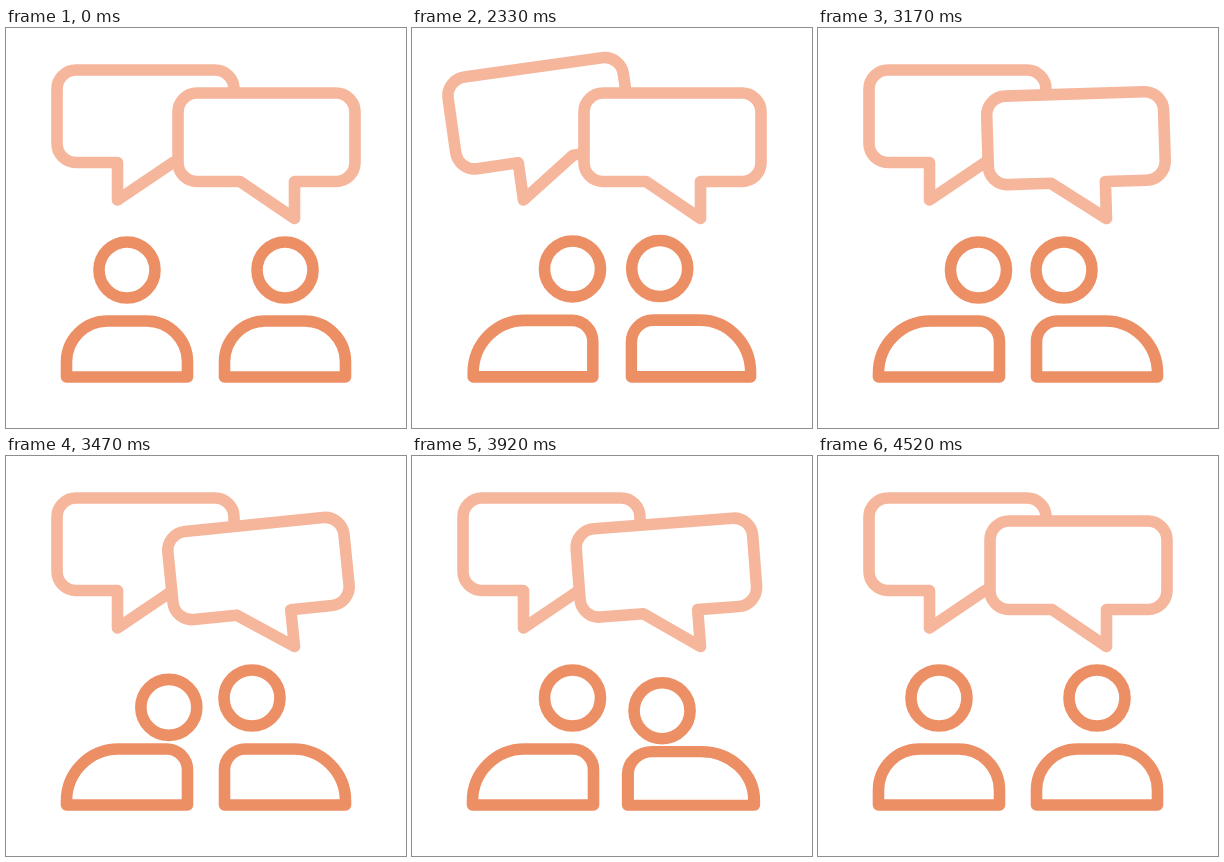
Animation, 400 px wide and 400 px high, one loop 4.55 s. Source, as an HTML page:

```html
<!DOCTYPE html>
<html lang="en">
<head>
<meta charset="utf-8">
<title>Conversation</title>
<style>
  html, body { margin: 0; height: 100%; overflow: hidden; background: #fff; }
  svg { display: block; width: 100vw; height: 100vh; }
  path, circle { stroke-width: 11.6; stroke-linejoin: round; fill: #fff; }
  .bubble { stroke: #f5b69c; }
  .person { stroke: #ed8f65; }
</style>
</head>
<body>
<svg viewBox="0 0 400 400">
  <path id="bubbleL" class="bubble" d="M111.5 172V134.5H70A19 19 0 0 1 51 115.5V61A19 19 0 0 1 70 42H209A19 19 0 0 1 228 61V115.5A19 19 0 0 1 209 134.5H167Z"/>
  <path id="bubbleR" class="bubble" d="M288.5 190.5V153.5H330A19 19 0 0 0 349 134.5V84A19 19 0 0 0 330 65H191A19 19 0 0 0 172 84V134.5A19 19 0 0 0 191 153.5H234Z"/>
  <g id="personL" class="person"><path/><circle r="28"/></g>
  <g id="personR" class="person" transform="translate(400) scale(-1 1)"><path/><circle r="28"/></g>
</svg>
<script>
const LOOP = 4550;
const $ = id => document.getElementById(id);
const mix = (a, b, k) => a + (b - a) * k;

// Eased value through [time, value] keys
function track(t, keys) {
  if (t <= keys[0][0]) return keys[0][1];
  for (let i = 1; i < keys.length; i++) {
    const [t0, v0] = keys[i - 1], [t1, v1] = keys[i];
    if (t < t1) {
      const k = (t - t0) / (t1 - t0);
      return mix(v0, v1, k * k * (3 - 2 * k));
    }
  }
  return keys[keys.length - 1][1];
}

const WIGGLE = [[-2, 0], [236, -21], [466, 14], [696, -9.2], [926, 3.8], [1156, 0]];
const SQUASH = [[0, 0], [100, 1], [280, -.25], [430, 0]];
const DIP = [[0, 0], [130, 14], [275, -1.5], [430, 0]];
const LEAN = [[110, 0], [320, 1]];

function drawBubble(id, t, x, y) {
  $(id).setAttribute("transform", `rotate(${track(t, WIGGLE)} ${x} ${y})`);
}

// A person leans in at `start`, and leans back at `end`
function drawPerson(id, t, start, end, reach, nod) {
  const both = keys => track(t - start, keys) + track(t - end, keys);
  const lean = track(t - start, LEAN) - track(t - end, LEAN);
  const squash = .06 * both(SQUASH);
  const outer = mix(41, 52, lean), inner = mix(41, 21, lean);
  const [body, head] = $(id).children;
  body.setAttribute("d", `M60.5 349V${293 + outer}A${outer} ${outer} 0 0 1 ${60.5 + outer} 293` +
    `H${181.5 - inner}A${inner} ${inner} 0 0 1 181.5 ${293 + inner}V349Z`);
  body.setAttribute("transform",
    `translate(121 355) scale(${1 + squash} ${1 - squash}) translate(-121 -355)`);
  head.setAttribute("cx", 121 + reach * lean + .25 * nod);
  head.setAttribute("cy", 242 + both(DIP) + nod);
}

function frame(now) {
  const t = now % LOOP;
  const nodTime = t - 2690;
  const nod = nodTime > 0 && nodTime < 960 ? 5.5 * (1 - Math.cos(nodTime / 480 * 2 * Math.PI)) : 0;
  drawBubble("bubbleL", t - 2000, 111.5, 172);
  drawBubble("bubbleR", t - 3130, 288.5, 190.5);
  drawPerson("personL", t, 2000, 4090, 39.5, nod);
  drawPerson("personR", t, 2040, 3765, 33, 0);
  requestAnimationFrame(frame);
}
const begin = performance.now();
frame(0);
function frameLoop() {}
</script>
</body>
</html>
```
